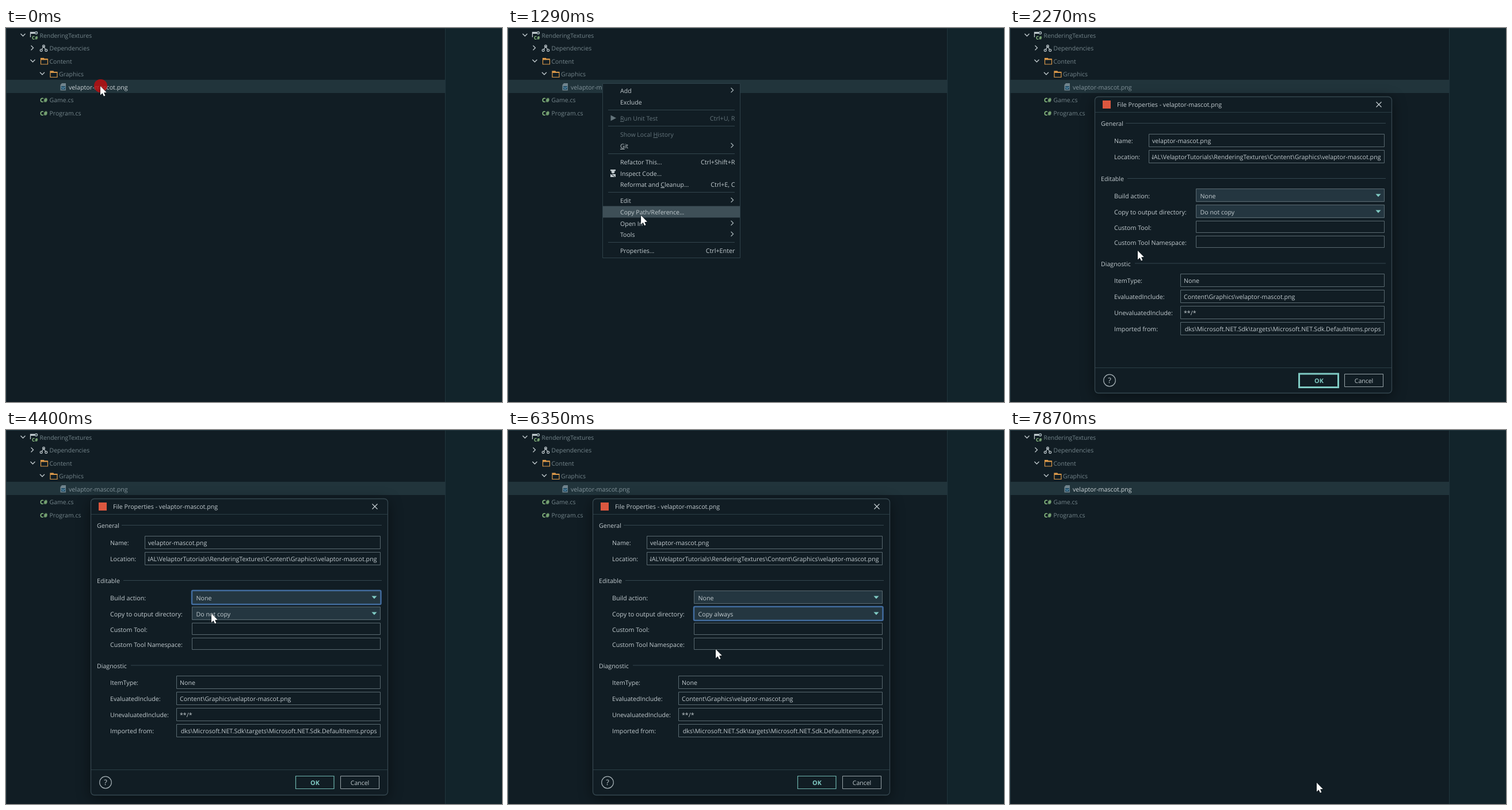
Animation of 862 by 650 pixels, one loop 7920 ms. Source, as an HTML page with a canvas:

```html
<!DOCTYPE html>
<html lang="en">
<head>
<meta charset="utf-8">
<style>
html, body { margin: 0; width: 100%; height: 100%; overflow: hidden; background: #111d24; }
canvas { display: block; }
</style>
</head>
<body>
<canvas id="stage" width="862" height="650"></canvas>
<script>
const ctx = document.getElementById('stage').getContext('2d');
const LOOP = 7920, STEP = 69;
const BG = '#111d24', ROW = '#21343b', LINE = '#2b3e46', BORDER = '#5a6a71';
const DIM = '#74858b', LIGHT = '#c3ccd0', TEAL = '#80cbc4', HOVER = '#3e4f57';
const ORANGE = '#dd9a4a', GREEN = '#95cb8a';
const FILE = 'velaptor-mascot.png';

function text(str, x, y, color = LIGHT, size = 10.65, align = 'left', weight = 400) {
  ctx.font = `${weight} ${size}px "Open Sans", "Noto Sans", sans-serif`;
  ctx.textRendering = 'geometricPrecision';
  ctx.textAlign = align;
  ctx.fillStyle = color;
  ctx.fillText(str, x, y + 4);
}

function fill(x, y, w, h, color) {
  ctx.fillStyle = color;
  ctx.fillRect(x, y, w, h);
}

function frame(x, y, w, h, color = BORDER, width = 1, radius = 0) {
  ctx.beginPath();
  ctx.roundRect(x, y, w, h, radius);
  ctx.strokeStyle = color;
  ctx.lineWidth = width;
  ctx.stroke();
}

function line(points, color, width = 1) {
  ctx.beginPath();
  points.forEach(([x, y]) => ctx.lineTo(x, y));
  ctx.strokeStyle = color;
  ctx.lineWidth = width;
  ctx.stroke();
}

function disc(x, y, r, color) {
  ctx.beginPath();
  ctx.arc(x, y, r, 0, 7);
  ctx.fillStyle = color;
  ctx.fill();
}

function ring(x, y, r, color, width = 1.2) {
  ctx.beginPath();
  ctx.arc(x, y, r, 0, 7);
  ctx.strokeStyle = color;
  ctx.lineWidth = width;
  ctx.stroke();
}

const chevronRight = (x, y, color) => line([[x - 2, y - 4], [x + 2, y], [x - 2, y + 4]], color, 1.3);
const chevronDown = (x, y) => line([[x - 4, y - 2], [x, y + 2], [x + 4, y - 2]], LIGHT, 1.3);

function folder(x, y) {
  line([[x, y], [x, y + 10.5], [x + 12, y + 10.5], [x + 12, y + 1.5], [x + 6, y + 1.5], [x + 5, y], [x, y], [x, y + 3]], ORANGE, 1.2);
  fill(x, y, 5.5, 3, ORANGE);
  fill(x + 5, y + 1, 7, 2, ORANGE);
}

function drawTree(active) {
  fill(0, 0, 862, 650, BG);
  fill(764, 0, 98, 650, '#12242b');
  fill(0, 90, 763, 23, ROW);
  fill(763, 0, 1, 650, '#20353d');
  fill(0, 0, 862, 1, '#22363e');
  fill(0, 0, 1, 650, '#22363e');

  chevronDown(29.5, 12);
  line([[42.5, 16], [42.5, 7.5], [50, 7.5]], LIGHT, 1.3);
  line([[42, 9], [50, 9]], LIGHT, 2);
  ring(52.5, 8.5, 2, '#a9b8bd', 1.5);
  text('C#', 45, 15.5, GREEN, 8.2, 'left', 700);
  text('RenderingTextures', 58.5, 13, DIM, 10.4);

  chevronRight(45.5, 34.5, LIGHT);
  line([[62, 38], [65.5, 32], [69, 38]], LIGHT, 1.2);
  ring(65.5, 31.5, 1.9, LIGHT);
  ring(61.2, 38.7, 1.9, LIGHT);
  ring(69.8, 38.7, 1.9, LIGHT);
  text('Dependencies', 75.5, 35, DIM, 10.5);

  chevronDown(46.5, 57);
  folder(60.5, 52.5);
  text('Content', 75.5, 57.5, DIM, 10.5);
  chevronDown(63, 79);
  folder(77, 75);
  text('Graphics', 92, 80, DIM, 10.5);

  ctx.beginPath();
  [[97, 96], [104, 96], [104, 108.5], [94.5, 108.5], [94.5, 99]].forEach(p => ctx.lineTo(...p));
  ctx.fillStyle = '#71848d';
  ctx.fill();
  fill(96, 101, 7, 6, '#24516b');
  line([[96.5, 103], [99, 105], [102.5, 103]], '#7fb2c9');
  text(FILE, 109, 102.5, active ? '#cbd3d6' : '#82939a', 10.7);

  ['Game.cs', 'Program.cs'].forEach((name, i) => {
    const y = 125 + i * 22.5;
    text('C#', 59, y, GREEN, 10.4, 'left', 700);
    text(name, 75.5, y, DIM, 10.5);
  });
}

// label, y, shortcut ('>' opens a submenu), underlined letter index, disabled
const menuItems = [
  ['Add', 109, '>'],
  ['Exclude', 129],
  ['Run Unit Test', 157, 'Ctrl+U, R', 0, true],
  ['Show Local History', 185, '', 11, true],
  ['Git', 205, '>', 0],
  ['Refactor This...', 233, 'Ctrl+Shift+R'],
  ['Inspect Code...', 252.5],
  ['Reformat and Cleanup...', 272, 'Ctrl+E, C', 13],
  ['Edit', 300, '>'],
  ['Copy Path/Reference...', 320],
  ['Open In', 340, '>'],
  ['Tools', 359, '>'],
  ['Properties...', 387, 'Ctrl+Enter']
];

function drawMenu(pointer) {
  fill(164, 96, 240, 304, BG);
  frame(164.5, 96.5, 239, 303, '#2e4149');
  [142, 170, 218, 285, 372].forEach(y => fill(174, y, 220, 1, '#33464e'));
  for (const [label, y, hint, mark, disabled] of menuItems) {
    const color = disabled ? '#64747b' : LIGHT;
    if (!disabled && pointer.x > 165 && Math.abs(pointer.y - y) < 9.9) fill(165, y - 10.5, 238, 20, HOVER);
    text(label, 195, y, color, 10.55);
    if (mark >= 0) {
      const start = ctx.measureText(label.slice(0, mark)).width;
      fill(195 + start, y + 5, ctx.measureText(label[mark]).width, 1, color);
    }
    if (hint === '>') chevronRight(389.5, y - 1, '#a3afb4');
    else if (hint) text(hint, 394.5, y, color, 10.8, 'right');
  }
  ctx.beginPath();
  [[178.5, 151.5], [188, 156.5], [178.5, 161.5]].forEach(p => ctx.lineTo(...p));
  ctx.fillStyle = '#64747b';
  ctx.fill();
  fill(178, 246, 9, 2.5, LIGHT);
  disc(182.5, 250, 2.8, LIGHT);
  fill(178, 254, 9, 5, LIGHT);
  line([[179, 254], [186, 258.5]], BG);
}

function section(label, y, x) {
  text(label, 158, y);
  fill(x, y - 1, 653 - x, 1, '#34474f');
}

function field(label, y, x, value = '', height = 22, tail = false) {
  text(label, 181, y);
  frame(x + .5, y - 11.5, 650 - x, height);
  ctx.save();
  ctx.beginPath();
  ctx.rect(x + 5.5, y - 11, 640 - x, 22);
  ctx.clip();
  text(value, tail ? 644.5 : x + 6, y, LIGHT, 10.65, tail ? 'right' : 'left');
  ctx.restore();
}

function combo(label, y, value, focused) {
  text(label, 181, y, LIGHT, 10.8);
  fill(323, y - 12, 328, 23, '#243640');
  if (focused) frame(323, y - 12.5, 328.5, 24, '#426c9e', 2.5, 2);
  else frame(323.5, y - 12, 327, 22);
  text(value, 330.5, y);
  ctx.beginPath();
  [[635.5, y - 3], [644.5, y - 3], [640, y + 2]].forEach(p => ctx.lineTo(...p));
  ctx.fillStyle = TEAL;
  ctx.fill();
}

function drawDialog(t, opacity) {
  const scale = .92 + .08 * opacity;
  ctx.save();
  ctx.globalAlpha = opacity;
  ctx.translate(405.5, 377);
  ctx.scale(scale, scale);
  ctx.translate(-405.5, -377);

  ctx.save();
  ctx.shadowColor = 'rgba(0,0,0,.45)';
  ctx.shadowBlur = 24;
  ctx.shadowOffsetY = 5;
  ctx.beginPath();
  ctx.roundRect(147, 119, 517, 516, 6);
  ctx.fillStyle = BG;
  ctx.fill();
  ctx.restore();
  frame(147.5, 119.5, 516, 515, '#35474f', 1.3, 6);
  fill(148, 146, 515, 1, LINE);
  fill(148, 590, 515, 1, LINE);

  fill(161, 126, 14, 14, '#dc573f');
  text('File Properties - ' + FILE, 186, 133);
  line([[636.5, 128.5], [645.5, 137.5]], LIGHT, 1.2);
  line([[645.5, 128.5], [636.5, 137.5]], LIGHT, 1.2);

  section('General', 166, 201);
  field('Name:', 196, 241, FILE);
  field('Location:', 224, 241, 'NAL\\VelaptorTutorials\\RenderingTextures\\Content\\Graphics\\' + FILE, 22, true);

  section('Editable', 262, 204);
  combo('Build action:', 291.5, 'None', t >= 3160 && t < 4800);
  combo('Copy to output directory:', 319.5, t < 6080 ? 'Do not copy' : 'Copy always', t >= 4800);
  field('Custom Tool:', 347, 323, '', 20);
  field('Custom Tool Namespace:', 373, 323, '', 20);

  section('Diagnostic', 409.5, 217);
  field('ItemType:', 439, 296, 'None');
  field('EvaluatedInclude:', 467, 296, 'Content\\Graphics\\' + FILE);
  field('UnevaluatedInclude:', 495, 296, '**/*');
  field('Imported from:', 523, 296, 'dks\\Microsoft.NET.Sdk\\targets\\Microsoft.NET.Sdk.DefaultItems.props', 22, true);

  ring(173, 612.5, 10.3, '#a4afb4');
  text('?', 173, 613, LIGHT, 13, 'center');
  if (t < 3160) frame(502.5, 601, 68, 23.5, TEAL, 3);
  else frame(503.5, 601.5, 66.5, 22, '#6fb5af', 1.2);
  text('OK', 537, 613, TEAL, 10.8, 'center', 700);
  frame(581.5, 601.5, 67, 22, '#98a4a9');
  text('Cancel', 615, 613, LIGHT, 10.5, 'center');
  ctx.restore();
}

function drawOptions(pointer) {
  fill(323, 331, 328, 65, BG);
  const hovered = Math.max(0, Math.min(2, Math.floor((pointer.y - 332) / 21)));
  fill(324, 332 + hovered * 21, 326, 21, HOVER);
  frame(323.5, 331.5, 327, 64);
  ['Do not copy', 'Copy if newer', 'Copy always'].forEach((label, i) => text(label, 330.5, 342.5 + i * 21));
}

// start, end, x, y reached, sideways bulge
const moves = [
  [460, 1640, 222, 387, 32],
  [2470, 3160, 352, 291, 0],
  [3840, 4400, 357, 319, 0],
  [5200, 5950, 361, 381, 0],
  [6620, 7450, 533, 613, 0]
];

function pointerAt(t) {
  let x = 164, y = 101;
  for (const [start, end, toX, toY, bulge] of moves) {
    if (t < start) break;
    const stepped = Math.floor((t - start) / STEP) * STEP;
    const u = t >= end ? 1 : stepped / (end - start);
    const s = u * u * (3 - 2 * u);
    x += (toX - x) * s + 4 * bulge * s * (1 - s);
    y += (toY - y) * s;
  }
  return { x, y };
}

const clicks = [[0, 130], [1850, 1920], [3160, 3230], [4800, 4930], [5950, 6080], [7450, 7510]];

function drawPointer(t, { x, y }) {
  if (clicks.some(([from, to]) => t >= from && t < to)) disc(x + .5, y - .5, 11.5, 'rgba(190,14,16,.82)');
  ctx.beginPath();
  [[0, 0], [0, 15.4], [3.6, 12.2], [6, 17.4], [8.4, 16.4], [6.1, 11.3], [10.8, 11]]
    .forEach(([dx, dy]) => ctx.lineTo(x + dx, y + dy));
  ctx.closePath();
  ctx.strokeStyle = '#0a1216';
  ctx.lineWidth = 1;
  ctx.stroke();
  ctx.fillStyle = '#fff';
  ctx.fill();
}

// quarter steps, the first one visible at once
const fade = (t, start) => Math.max(0, Math.min(1, (Math.floor((t - start) / STEP) + 1) / 4));

function render() {
  const t = performance.now() % LOOP;
  const pointer = pointerAt(t);
  drawTree(t < 130 || t >= 7510);
  if (t >= 130 && t < 1920) drawMenu(pointer);
  const opacity = fade(t, 2060) - fade(t, 7510);
  if (opacity > 0) drawDialog(t, opacity);
  if (t >= 4930 && t < 6080) drawOptions(pointer);
  drawPointer(t, pointer);
  requestAnimationFrame(render);
}
render();
</script>
</body>
</html>
```
